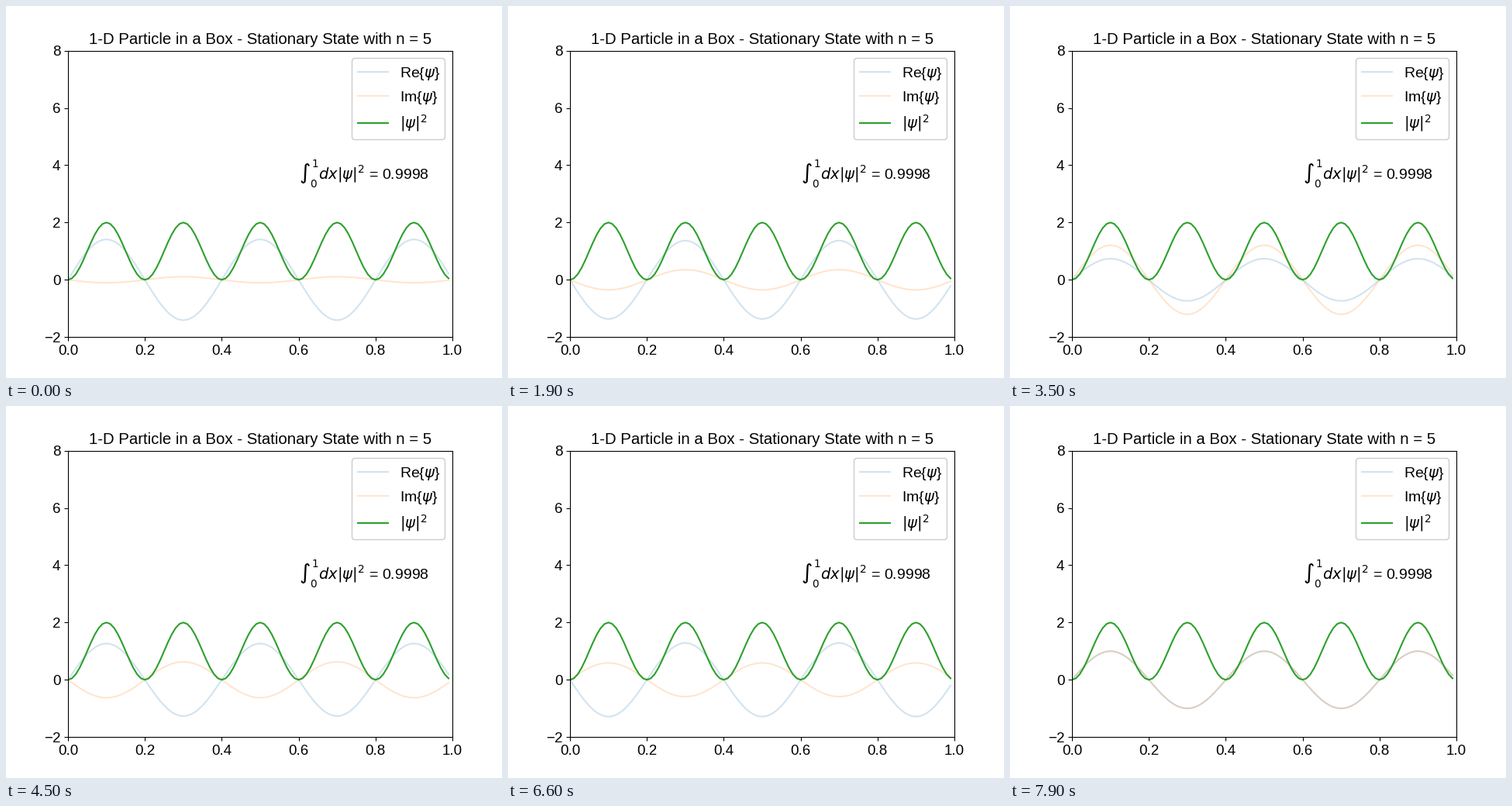
Write a matplotlib script that moves like this. It is 640 px wide and 480 px high and loops after 8000 ms.

```python
import numpy as np
import matplotlib.pyplot as plt
from matplotlib.animation import FuncAnimation
from matplotlib.lines import Line2D
from matplotlib.patches import FancyBboxPatch

W, H, DPI = 640, 480, 100
FRAMES, INTERVAL = 80, 100
N = 5
STEP = 0.14819  # phase advance per frame, radians

plt.rcParams.update({
    "font.family": "Liberation Sans",
    "font.size": 14,
    "mathtext.fontset": "dejavusans",
})

fig, ax = plt.subplots(figsize=(W / DPI, H / DPI), dpi=DPI)
fig.subplots_adjust(left=0.125, right=0.9, bottom=0.11, top=0.88)
ax.set_xlim(0, 1)
ax.set_ylim(-2, 8)
ax.tick_params(labelsize=13.5)
ax.set_title("1-D Particle in a Box - Stationary State with n = 5", fontsize=14.7)

x = np.arange(0, 1, 0.01)
mode = np.sqrt(2) * np.sin(N * np.pi * x)
density = mode ** 2
area = np.sum((density[1:] + density[:-1]) / 2) * 0.01

re_line, = ax.plot(x, mode, color="C0", alpha=0.2)
im_line, = ax.plot(x, 0 * x, color="C1", alpha=0.2)
ax.plot(x, density, color="C2")
ax.text(0.6, 3.5, rf"$\int_0^1 dx|\psi|^2$ = {area:.4f}")


def add_key():
    """Legend laid out in pixels, y counted from the top."""
    box = FancyBboxPatch((446.5, H - 172.5), 120, 105,
                         boxstyle="round,pad=0,rounding_size=3.9",
                         fc="white", ec="0.8", lw=1, transform=None, zorder=5)
    fig.add_artist(box)
    rows = [(84.7, "C0", 0.2, r"Re{$\psi$}"),
            (116.2, "C1", 0.2, r"Im{$\psi$}"),
            (151, "C2", 1, r"$|\psi|^2$")]
    for y, color, alpha, label in rows:
        fig.add_artist(Line2D([453.8, 492.7], [H - y] * 2, color=color, alpha=alpha,
                              solid_capstyle="projecting", transform=None, zorder=6))
        fig.text(508.5, H - y - 6.8, label, transform=None, zorder=6)


def update(i):
    phase = STEP * (i + 0.5)
    re_line.set_ydata(mode * np.cos(phase))
    im_line.set_ydata(-mode * np.sin(phase))
    return re_line, im_line


add_key()
anim = FuncAnimation(fig, update, frames=FRAMES, interval=INTERVAL,
                     repeat=True, repeat_delay=0, blit=False)
plt.show()
```
